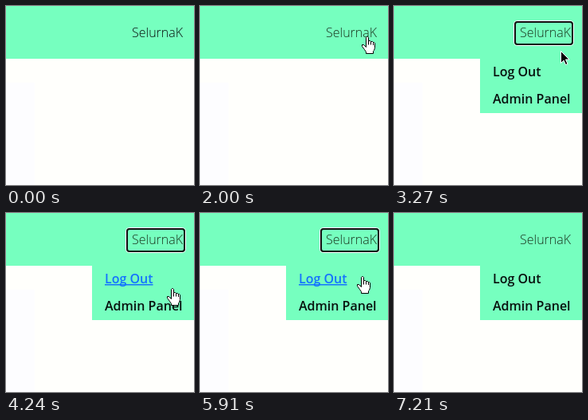
An HTML page with a canvas that plays this animation: 236 by 224 pixels, repeating every 7.24 s.

```html
<!DOCTYPE html>
<html lang="en">
<head>
<meta charset="utf-8">
<title>User menu</title>
<style>
  html, body { margin: 0; width: 100%; height: 100%; overflow: hidden; background: #fffffc; }
  canvas { display: block; }
</style>
</head>
<body>
<canvas id="stage" width="236" height="224"></canvas>
<script>
const ctx = document.getElementById('stage').getContext('2d');
const LOOP = 7240;
const MINT = '#76ffbf';
const INK = [8, 16, 13], FADED = [26, 54, 30], BLUE = [20, 114, 255];

// Pointer hot spot: time, x, y
const PATH = [
  [940, 158, -2], [1360, 209, 38], [3150, 209, 38], [3270, 209, 56],
  [3800, 208, 94], [4240, 208, 94], [4600, 207, 118], [5240, 207, 118],
  [5700, 203, 79], [6170, 203, 79], [6450, 30, 98]
];
const HOVER = {
  name: [[1200, 3200]],
  logOut: [[3440, 4357], [5457, 6330]],
  admin: [[4357, 5457]]
};
const OPEN = 2390, BLUR = 7210, FADE = 420;

const ARROW = new Path2D('M.5 .5V15.5L4 12L6.5 17.5L9 16.5L6.5 11H11Z');
const HAND = new Path2D('M-.5 13.5V1.5L.5 .5H1.5L2.5 1.5V5.5H4.5L5.5 6.5H7.5L8.5 7.5H9.5' +
  'L10.5 8.5V14.5L9.5 17.5L8.5 18.5V21.5H-.5V19.5L-2.5 16.5L-5.5 12.5V10.5H-3.5Z' +
  'M2.5 5.5V10.5M5.5 6.5V10.5M8.5 7.5V11');

const clamp = v => Math.max(0, Math.min(1, v));
const smooth = v => (v = clamp(v), v * v * (3 - 2 * v));
const mix = (a, b, k) => `rgb(${a.map((v, i) => Math.round(v + (b[i] - v) * k))})`;
const during = (spans, t) => spans.some(([a, b]) => t >= a && t < b);
const glow = (spans, t) => Math.max(...spans.map(([a, b]) =>
  smooth((t - a) / FADE) * (1 - smooth((t - b) / FADE))));

function rect(color, x, y, w, h) {
  ctx.fillStyle = color;
  ctx.fillRect(x, y, w, h);
}

function ring(color, x, y, w, h, radius, width) {
  ctx.strokeStyle = color;
  ctx.lineWidth = width;
  ctx.beginPath();
  ctx.roundRect(x, y, w, h, radius);
  ctx.stroke();
}

function text(label, x, y, weight, color, align = 'left') {
  ctx.font = `${weight} 16px "Open Sans", sans-serif`;
  ctx.textAlign = align;
  ctx.fillStyle = color;
  ctx.fillText(label, x, y);
}

function menuItem(label, y, spans, t) {
  const color = mix(INK, BLUE, glow(spans, t));
  text(label, 124, y, 600, color);
  if (during(spans, t)) rect(color, 124, y + 1, ctx.measureText(label).width, 1.5);
}

function pointer(t) {
  const i = PATH.findIndex(([time]) => time > t);
  if (i < 1) return;
  const [t0, x0, y0] = PATH[i - 1], [t1, x1, y1] = PATH[i];
  const k = smooth((t - t0) / (t1 - t0));
  const isHand = Object.values(HOVER).some(spans => during(spans, t));
  const shape = isHand ? HAND : ARROW;
  ctx.save();
  ctx.translate(Math.round(x0 + (x1 - x0) * k), Math.round(y0 + (y1 - y0) * k));
  ctx.lineWidth = 1;
  ctx.fillStyle = isHand ? '#fff' : '#000';
  ctx.strokeStyle = isHand ? '#000' : '#fff';
  ctx.fill(shape);
  ctx.stroke(shape);
  ctx.restore();
}

function draw(t) {
  rect('#fffffc', 0, 0, 236, 224);
  rect('#fdfdff', 0, 96, 36, 128);
  rect(MINT, 0, 0, 236, 66);

  text('SelurnaK', 222, 39, 300, mix(INK, FADED, smooth((t - 20) / 220)), 'right');

  if (t >= OPEN) {
    ctx.globalAlpha = smooth((t - OPEN + 30) / 600);
    rect(MINT, 108, 66, 128, 68);
    menuItem('Log Out', 88, HOVER.logOut, t);
    menuItem('Admin Panel', 122, HOVER.admin, t);
    ctx.globalAlpha = 1;
    if (t < BLUR) {
      ring('#fff', 150.5, 18.5, 75, 31, 4, 1);
      ring('#101010', 152, 20, 72, 28, 3, 2);
    }
  }
  pointer(t);
}

function frame() {
  draw(performance.now() % LOOP);
  requestAnimationFrame(frame);
}
frame();
</script>
</body>
</html>
```
